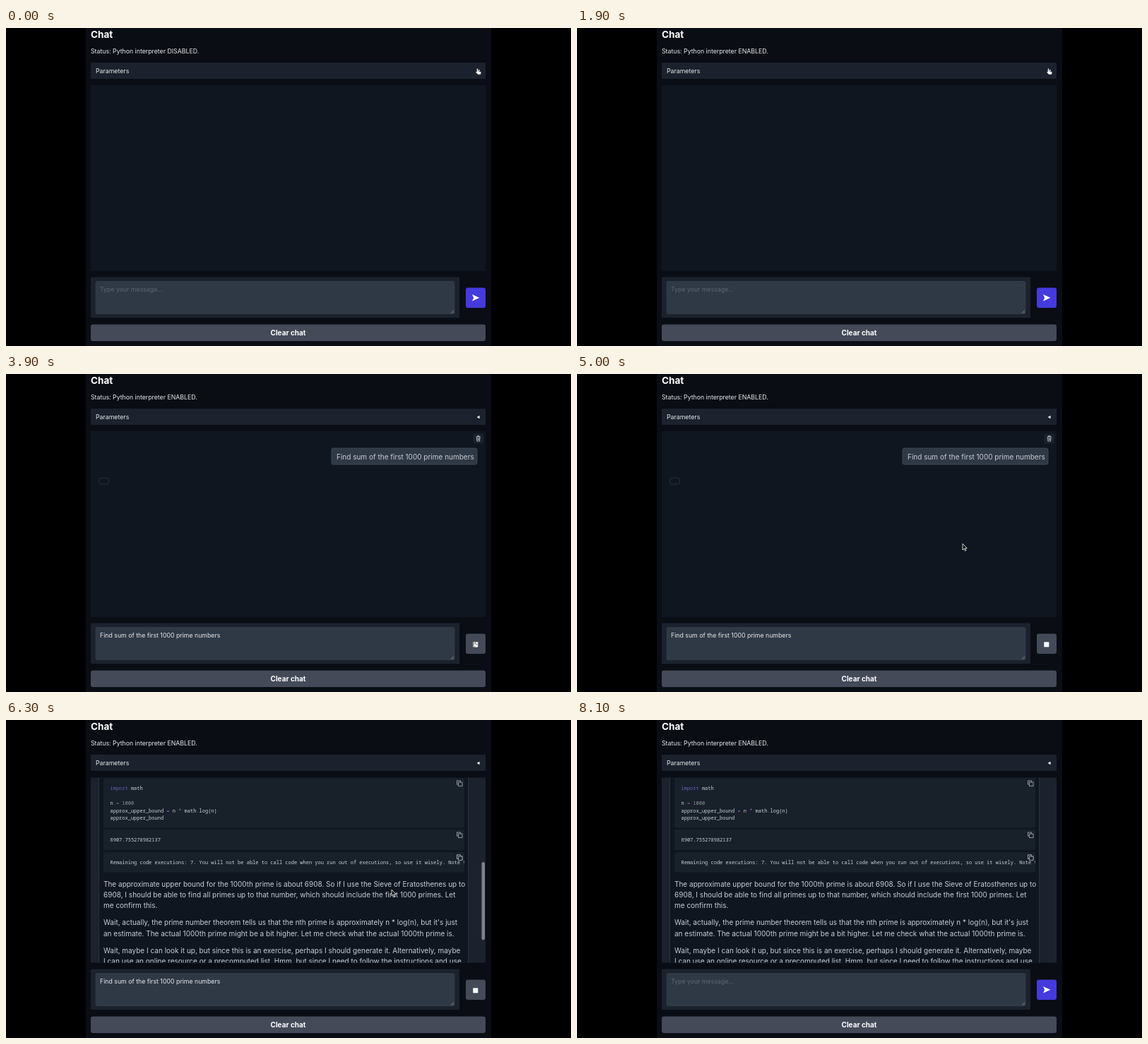
An HTML page for the animation above (8200 ms loop, 800 by 450 pixels).

```html
<!DOCTYPE html>
<html lang="en">
<head>
<meta charset="utf-8">
<title>Chat</title>
<style>
html, body { margin: 0; width: 100%; height: 100%; overflow: hidden; background: #000; }
svg { display: block; width: 800px; height: 450px; }
text { font: 8.75px Inter, sans-serif; fill: #e8eaed; white-space: pre; }
.title { font-size: 13.5px; font-weight: 700; fill: #fff; }
.badge { font-weight: 700; fill: #fff; }
.chat { font-size: 10px; fill: #c9cdd4; }
.small { font-size: 7.5px; }
.dim { fill: #8f96a3; }
.code { font: 7px "Noto Sans Mono", monospace; fill: #cdd1d8; }
.timer { font: 600 7px "Noto Sans Mono", monospace; }
.button { font-size: 10px; font-weight: 700; fill: #fff; }
.mid { text-anchor: middle; }
.kw { fill: #6a5fb5; } .op { fill: #9a62c0; } .num { fill: #92959c; }
</style>
</head>
<body>
<svg id="stage" viewBox="0 0 800 450"></svg>
<script>
const LOOP = 8200, STEP = 100;
const APP = '#0a0d14', BLOCK = '#1b222d', DARK = '#0f1620', INPUT = '#2f3845',
      GREY = '#444a58', ACCENT = '#453adc', LINE = '#2b313b';
const PROMPT = 'Find sum of the first 1000 prime numbers';

const paragraphs = [
  ['<think>Okay, so I need to find the sum of the first 1000 prime numbers. Hmm, that sounds like a task that',
   'requires generating prime numbers and then summing them up. Let me break this down into steps.'],
  ['First, I need a way to generate prime numbers. The Sieve of Eratosthenes comes to mind—it\'s an efficient',
   'algorithm for finding all primes up to a given limit. But wait, since I need the first 1000 primes, maybe I',
   'need to estimate an upper bound for the 1000th prime? Because the Sieve of Eratosthenes requires knowing',
   'the upper limit to generate primes up to that limit.'],
  ['Alternatively, maybe I can use a dynamic approach where I keep generating primes until I reach 1000 of',
   'them. That might be more efficient than estimating the upper bound. Let me check.'],
  ['I remember that the nth prime number is approximately n * log(n). So for n=1000, the 1000th prime should',
   'be around 1000 * log(1000). Let me calculate that.'],
  ['Wait, log base e? Yes, natural logarithm. Let\'s compute that.']
];
const later = [
  ['The approximate upper bound for the 1000th prime is about 6908. So if I use the Sieve of Eratosthenes up to',
   '6908, I should be able to find all primes up to that number, which should include the first 1000 primes. Let',
   'me confirm this.'],
  ['Wait, actually, the prime number theorem tells us that the nth prime is approximately n * log(n), but it\'s just',
   'an estimate. The actual 1000th prime might be a bit higher. Let me check what the actual 1000th prime is.'],
  ['Wait, maybe I can look it up, but since this is an exercise, perhaps I should generate it. Alternatively, maybe',
   'I can use an online resource or a precomputed list. Hmm, but since I need to follow the instructions and use']
];
const remaining = 'Remaining code executions: 7. You will not be able to call code when you run out of ' +
  'executions, so use it wisely. Note that';

// Lay paragraphs out as {y, text} rows starting at a baseline.
const layout = (paras, y) => paras.flatMap(p => {
  const rows = p.map((text, i) => ({ y: y + i * 15.07, text }));
  y += (p.length - 1) * 15.07 + 24.6;
  return rows;
});
const rows = [...layout(paragraphs, 162.6), ...layout(later, 513.2)];

const esc = s => s.replace(/&/g, '&amp;').replace(/</g, '&lt;');
const box = (x, y, w, h, fill, r = 0, more = '') =>
  `<rect x="${x}" y="${y}" width="${w}" height="${h}" rx="${r}" fill="${fill}" ${more}/>`;
const raw = (x, y, s, cls = '') => `<text x="${x}" y="${y}" class="${cls}">${s}</text>`;
const text = (x, y, s, cls) => raw(x, y, esc(s), cls);
const path = (d, fill, stroke = 'none', w = 1) =>
  `<path d="${d}" fill="${fill}" stroke="${stroke}" stroke-width="${w}"/>`;
const span = (cls, s) => `<tspan class="${cls}">${s}</tspan>`;
const clamp = v => Math.max(0, Math.min(1, v));

// Interpolate rows of [time, ...values].
function track(keys, t, ease = k => k) {
  if (t <= keys[0][0]) return keys[0].slice(1);
  const i = keys.findIndex(k => k[0] > t);
  if (i < 0) return keys[keys.length - 1].slice(1);
  const a = keys[i - 1], b = keys[i], k = ease((t - a[0]) / (b[0] - a[0]));
  return a.slice(1).map((v, j) => v + (b[j + 1] - v) * k);
}
const smooth = k => k * k * (3 - 2 * k);

const pointerKeys = [
  [0, 668, 57], [100, 668, 57], [700, 181, 135], [1100, 181, 135], [1700, 668, 57], [1900, 668, 57],
  [2300, 364, 387], [2900, 364, 387], [3500, 664, 378], [4200, 664, 378], [4400, 568, 264],
  [4900, 568, 264], [5000, 546, 240], [6700, 546, 240], [7400, 664, 378]
];
const heightKeys = [[5000, 85], [5600, 256], [5700, 256], [5800, 429], [6300, 622], [6600, 632]];
const scrollKeys = [[5700, 0], [5800, 54], [6300, 277.5]];

function pointer(t) {
  if (t >= 7700) return '';
  const [x, y] = track(pointerKeys, t, smooth);
  const near = (px, py) => Math.hypot(x - px, y - py) < 12;
  let shape;
  if (near(668, 57) || near(664, 378)) {
    shape = path('M-1.5 1Q-.3 -.5 .6 1V4L4 4.7Q5 5 4.8 6.5L4 9H0L-3 5.6Q-3 4.4 -1.5 5Z', '#fff', '#222', .6);
  } else if (t >= 2200 && t < 3100 && y > 355) {
    shape = path('M-2 -4.5Q0 -4.5 0 -3Q0 -4.5 2 -4.5M0 -3V3M-2 4.5Q0 4.5 0 3Q0 4.5 2 4.5M-1 1H1', 'none', '#e8e8e8', .9);
  } else {
    shape = path('M0 0V9L2.1 7.1L3.5 10.3L5 9.6L3.6 6.6H6.2Z', '#111', '#fff', .8);
  }
  return `<g transform="translate(${x} ${y})">${shape}</g>`;
}

const badge = (x, y, w, s) => box(x, y, w, 16, ACCENT, 3) + text(x + 3.5, y + 11, s, 'badge');

function slider(x, end, at, value, low, high, fieldX, fieldW) {
  const from = x + (low === '0' ? 11 : 14);
  return box(fieldX, 80, fieldW, 14, '#2c3440', 2) + text(fieldX + fieldW / 2 - 3, 90, value, 'mid') +
    box(fieldX + fieldW + 1, 80, 15, 14, '#2c3440', 2) +
    raw(fieldX + fieldW + 8.5, 90, '↺', 'mid') +
    text(x, 109.7, low, 'small dim') + text(end + 5, 109.7, high, 'small dim') +
    box(from, 104.7, end - from, 4.6, '#e4e5e8', 2.3) + box(from, 104.7, at - from, 4.6, ACCENT, 2.3) +
    `<circle cx="${at}" cy="106.8" r="5.2" fill="#fff"/>`;
}

function parameters(t, open) {
  let s = box(120, 49, 559, open ? 198.5 : 23, BLOCK, 1) + text(127, 64, 'Parameters');
  if (!open) return s + path('M666.7 61L670.5 58.8V63.2Z', '#fff');
  s += path('M667 59H671.8L669.4 63.4Z', '#fff') +
    badge(134, 77, 77, 'Max new tokens') + badge(406, 77, 62, 'Temperature') +
    slider(134, 363, 193.5, '4000', '50', '20000', 336, 40) +
    slider(406, 650, 421, '0', '0', '1.2', 612, 36);
  const on = t >= 700;
  if (t >= 700 && t < 1000) {
    const time = ((t - 700) / 1000).toFixed(1) + 's';
    s += box(127, 127, 58, 91, '#111722');
    for (const [y, labelY] of [[139, 146], [184, 213]])
      s += `<circle cx="399" cy="${y}" r="4" fill="#4037a6"/>` + text(650, labelY, time, 'timer');
  } else {
    s += box(134, 135, 9, 9, on ? ACCENT : INPUT, 2, 'stroke="#4b5563" stroke-width=".6"') +
      (on ? path('M136 139.5L138 141.5L141.3 137.3', 'none', '#fff', 1.2) : '') +
      text(148, 142.7, 'Enable Python interpreter') +
      box(134, 180, 531, 26, INPUT, 3) + text(141, 196, on ? 'python' : 'default') +
      path('M654 191.5H660L657 195Z', '#cfd2d8');
  }
  return s + badge(134, 157, 70, 'Prompt Config') +
    box(127, 227, 545, 14.5, GREY, 2) + text(399.5, 237, 'Reset to defaults', 'small mid');
}

const copyIcon = y => `<g transform="translate(638.5 ${y})" fill="${BLOCK}" stroke="#a9adb5" stroke-width=".8">` +
  '<rect width="5" height="5"/><rect x="2" y="2" width="5.5" height="5.5"/></g>';
const codeBox = (y, h) => box(138, y, 511, h, '#18202a', 2) + copyIcon(y + 4);

function reply(height) {
  const bottom = 71 + height, width = height > 90 ? 523 : 14;
  let s = box(131.5, 147, width, height - 76, DARK, 3, `stroke="${LINE}"`);
  for (const { y, text: line } of rows) {
    const shown = clamp((bottom - y + 5) / 15);
    if (shown > 0 && height > 90) s += text(138, y, line.slice(0, Math.ceil(shown * line.length)), 'chat');
  }
  if (bottom > 400) {
    s += codeBox(359.5, 70.5) +
      raw(147.5, 376.5, span('kw', 'import') + ' math', 'code') +
      raw(147.5, 397.5, `n ${span('op', '=')} ${span('num', '1000')}`, 'code') +
      raw(147.5, 408, `approx_upper_bound ${span('op', '=')} n ${span('op', '*')} math${span('op', '.')}log(n)`, 'code') +
      raw(147.5, 418.5, 'approx_upper_bound', 'code') +
      codeBox(432.5, 29) + text(147.5, 449.7, '6907.755278982137', 'code') +
      codeBox(464.5, 28.5) + `<g clip-path="url(#codeClip)">${text(147.5, 481.2, remaining, 'code')}</g>` +
      copyIcon(468.5);
  }
  return s;
}

function conversation(t) {
  if (t < 3800) return box(120, 81.5, 559, 262, DARK, 1, 'stroke="#121923" stroke-width=".6"');
  const [height] = track(heightKeys, t), [scroll] = track(scrollKeys, t);
  let s = box(120, 81.5, 559, 262, BLOCK, 1) +
    `<g clip-path="url(#chatClip)"><g transform="translate(0 ${-scroll})">` +
    box(120, 81.5, 559, 262, DARK) +
    box(661.5, 84.5, 14.5, 14, BLOCK, 2) +
    path('M665.8 89H671.7M667.5 89V87.7H670V89M666.5 89.3L666.9 95H670.6L671 89.3M668 90.7V93.4M669.5 90.7V93.4', 'none', '#d4d7dc', .8) +
    box(461, 105, 206, 23, INPUT, 2.5, 'stroke="#454e5b" stroke-width=".8"') +
    text(468, 121, PROMPT, 'chat') + reply(height) + '</g>';
  if (t >= 5800 && t < 6900) {
    const ratio = 262 / height;
    s += box(673.5, 84 + scroll * ratio, 4.5, 262 * ratio, '#7d828b', 2.2);
  }
  if (t >= 5800 && height - scroll - 262 > 100) {
    s += `<circle cx="399.3" cy="275" r="8" fill="${DARK}"/>` +
      path('M399.3 270.5V279M395.5 275.4L399.3 279.2L403.1 275.4', 'none', '#fff', 1.2);
  }
  return s + '</g>';
}

function composer(t) {
  const typed = PROMPT.slice(0, Math.round(PROMPT.length * clamp((t - 2200) / 400)));
  const caret = t >= 2200 && t < 3500 ? '|' : '';
  const empty = t < 2300 || t >= 7600, busy = t >= 3800 && t < 7600;
  return box(120, 352.5, 522, 57.5, BLOCK, 1) +
    box(127, 358.5, 508, 46, INPUT, 2, 'stroke="#39424f" stroke-width=".6"') +
    path('M630 403.5L634 399.5M632.3 403.5L634 401.8', 'none', '#a5a9b0', .7) +
    (empty ? raw(133, 373, 'Type your message...', '" style="fill:#5d6673') : text(133, 373, typed + caret)) +
    box(651, 367.5, 28, 28.5, busy ? GREY : ACCENT, 3) +
    (busy ? box(661.3, 379.3, 7, 7, '#fff') : path('M660 377L670.3 381.8L660 386.6L662.2 381.8Z', '#fff')) +
    box(120, 419.5, 559, 23.5, GREY, 3) + text(399.5, 434.7, 'Clear chat', 'button mid');
}

function scene(t) {
  const open = t >= 100 && t < 1900, loading = t >= 700 && t < 1000;
  const status = `Status: Python interpreter ${t < 1000 ? 'DISABLED' : 'ENABLED'}.`;
  return '<defs><clipPath id="chatClip"><rect x="120" y="81.5" width="559" height="262"/></clipPath>' +
    '<clipPath id="codeClip"><rect x="138" y="464" width="511" height="30"/></clipPath></defs>' +
    box(0, 0, 800, 450, '#000') + box(113, 0, 574, 450, APP) +
    text(120, 13.5, 'Chat', 'title') +
    `<g opacity="${loading ? .18 : 1}">${text(120, 36, status)}</g>` +
    parameters(t, open) +
    `<g transform="translate(0 ${open ? 175.5 : 0})">${conversation(t)}${composer(t)}</g>` +
    pointer(t);
}

const stage = document.getElementById('stage');
const start = performance.now();
let last = -1;
function frame() {
  const t = Math.floor(((performance.now() - start) % LOOP) / STEP) * STEP;
  if (t !== last) stage.innerHTML = scene(last = t);
  requestAnimationFrame(frame);
}
frame();
</script>
</body>
</html>
```
